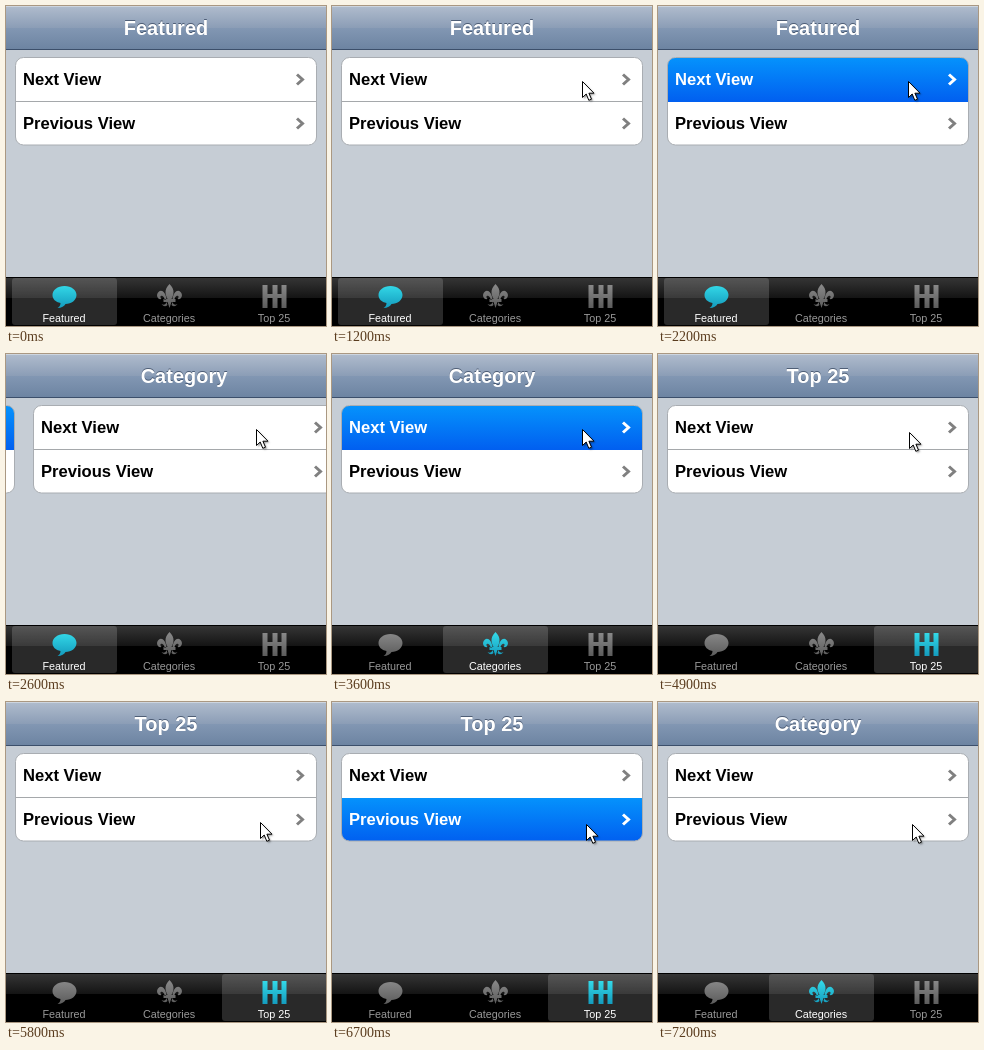
Animation of 320 by 320 pixels, one loop 8 s. Source, as an HTML page with a canvas:

```html
<!DOCTYPE html>
<html lang="en">
<head>
<meta charset="utf-8">
<title>Tab view slides</title>
<style>
  html, body { margin: 0; width: 100%; height: 100%; overflow: hidden; background: #c6cdd5; }
  canvas { display: block; width: 100vw; height: 100vh; }
</style>
</head>
<body>
<canvas id="stage" width="320" height="320"></canvas>
<script>
const ctx = document.getElementById('stage').getContext('2d');
const LOOP = 8000, STEP = 100, SLIDE_MS = 300;
const FONT = '"Liberation Sans", Arial, sans-serif';
const TITLES = ['Featured', 'Category', 'Top 25'];
const TABS = ['Featured', 'Categories', 'Top 25'];
const ROWS = ['Next View', 'Previous View'];

// Each press highlights a row, slides the next view in, then updates the tab bar.
const PRESSES = [
  { from: 0, to: 1, row: 0, press: 2200, slide: 2350, done: 2800 },
  { from: 1, to: 2, row: 0, press: 3600, slide: 3750, done: 4200 },
  { from: 2, to: 1, row: 1, press: 6700, slide: 6850, done: 7200 }
];
// time, x, y
const CURSOR_PATH = [
  [800, 294, 97], [1200, 250, 75], [4800, 250, 75],
  [4900, 251, 78], [5700, 254, 117], [5900, 254, 122]
];

const ICONS = [
  new Path2D('M0-10C7-10 12-6 12-1C12 4 7 8 1 8C0 10-3 12-7 12C-5 11-4 9-4 7C-9 6-12 3-12-1C-12-6-7-10 0-10Z'),
  new Path2D('M0-12C6-6 4-1 2 3H-2C-4-1-6-6 0-12Z' +
    'M3 3C4-4 8-7 11-4C14-1 12 4 8 3C10 1 9-1 7 0C5 1 5 3 5 4Z' +
    'M-3 3C-4-4-8-7-11-4C-14-1-12 4-8 3C-10 1-9-1-7 0C-5 1-5 3-5 4Z' +
    'M-6 3H6V6H-6Z M-2 6H2L0 12Z M3 6Q4 10 8 8Q5 12 2 9Z M-3 6Q-4 10-8 8Q-5 12-2 9Z'),
  new Path2D('M-12-11H-7V-2H-2V-11H3V-2H7V-11H12V12H7V2H3V12H-2V2H-7V12H-12Z')
];
const ARROW = new Path2D('M.5.5V16.5L4.2 13L6.8 19.3L9.5 18.2L6.9 12.2H12Z');

function gradient(top, bottom, ...colors) {
  const g = ctx.createLinearGradient(0, top, 0, bottom);
  colors.forEach((c, i) => g.addColorStop(i / (colors.length - 1), c));
  return g;
}

function box(x, y, w, h, fill) {
  ctx.fillStyle = fill;
  ctx.fillRect(x, y, w, h);
}

function text(str, x, y, font, color, align = 'left') {
  ctx.font = `${font} ${FONT}`;
  ctx.textAlign = align;
  ctx.fillStyle = color;
  ctx.fillText(str, x, y);
}

// The ease-in-out cubic Bezier (.42, 0, .58, 1), solved by Newton's method.
function easeInOut(x) {
  if (x <= 0) return 0;
  if (x >= 1) return 1;
  let s = x;
  for (let i = 0; i < 5; i++) {
    s -= (1.26 * s - 0.78 * s * s + 0.52 * s ** 3 - x) / (1.26 - 1.56 * s + 1.56 * s * s);
  }
  return s * s * (3 - 2 * s);
}

function drawBackground() {
  box(0, 0, 320, 320, '#c6cdd5');
  box(0, 0, 320, 22, gradient(0, 22, '#b0bccd', '#8b9db6'));
  box(0, 22, 320, 21, gradient(22, 43, '#8297b3', '#6d84a2'));
  box(0, 0, 320, 1, '#cdd5df');
  box(0, 43, 320, 1, '#3c4f6b');
}

function drawView(view, dx, pressedRow) {
  ctx.save();
  ctx.translate(dx, 0);
  text(TITLES[view], 160, 28, 'bold 20px', 'rgba(40,55,80,.65)', 'center');
  text(TITLES[view], 160, 29, 'bold 20px', '#fff', 'center');

  const list = new Path2D();
  list.roundRect(9.5, 51.5, 301, 87.5, 8);
  ctx.save();
  ctx.clip(list);
  box(9, 51, 302, 89, '#fff');
  if (pressedRow >= 0) {
    const top = 52 + 44 * pressedRow;
    box(9, top, 302, 44, gradient(top, top + 44, '#0592fc', '#015ff0'));
  }
  if (pressedRow < 0) box(9, 95, 302, 1, '#a5a8ab');
  ctx.restore();
  ctx.lineWidth = 1;
  ctx.strokeStyle = '#a9adb2';
  ctx.stroke(list);

  ROWS.forEach((label, i) => {
    const y = 73 + 44 * i, pressed = i === pressedRow;
    text(label, 17, y + 6, 'bold 16.6px', pressed ? '#fff' : '#000');
    ctx.strokeStyle = pressed ? '#fff' : '#808080';
    ctx.lineWidth = 3;
    ctx.beginPath();
    ctx.moveTo(291, y - 4.5);
    ctx.lineTo(296.5, y + 0.5);
    ctx.lineTo(291, y + 5.5);
    ctx.stroke();
  });
  ctx.restore();
}

function drawTabs(active) {
  box(0, 271, 320, 49, '#000');
  box(0, 272, 320, 20, gradient(272, 292, '#353535', '#141414'));
  TABS.forEach((label, i) => {
    const left = 6 + 105 * i, on = i === active;
    if (on) {
      ctx.fillStyle = 'rgba(255,255,255,.16)';
      ctx.beginPath();
      ctx.roundRect(left, 272, 105, 47, 3);
      ctx.fill();
    }
    ctx.save();
    ctx.translate(left + 52.5, 290);
    ctx.fillStyle = on ? gradient(-12, 12, '#35dcea', '#149bbd') : gradient(-12, 12, '#8a8a8a', '#5c5c5c');
    ctx.fill(ICONS[i]);
    ctx.restore();
    text(label, left + 52, 316, '10.8px', on ? '#fff' : '#999', 'center');
  });
}

function drawCursor(t) {
  if (t < CURSOR_PATH[0][0]) return;
  const next = CURSOR_PATH.findIndex(p => p[0] > t);
  const b = CURSOR_PATH.at(next), a = next < 0 ? b : CURSOR_PATH[next - 1];
  const k = a === b ? 0 : (t - a[0]) / (b[0] - a[0]);
  ctx.save();
  ctx.translate(Math.round(a[1] + (b[1] - a[1]) * k), Math.round(a[2] + (b[2] - a[2]) * k));
  ctx.shadowColor = 'rgba(0,0,0,.4)';
  ctx.shadowBlur = 2;
  ctx.shadowOffsetX = ctx.shadowOffsetY = 1.5;
  ctx.fillStyle = '#fff';
  ctx.fill(ARROW);
  ctx.shadowColor = 'transparent';
  ctx.strokeStyle = '#000';
  ctx.lineWidth = 1;
  ctx.stroke(ARROW);
  ctx.restore();
}

function draw(time) {
  const t = Math.floor((time % LOOP) / STEP) * STEP;
  const event = PRESSES.findLast(p => t >= p.press);
  drawBackground();
  if (!event) {
    drawView(0, 0, -1);
    drawTabs(0);
  } else {
    const progress = easeInOut((t - event.slide) / SLIDE_MS);
    const direction = Math.sign(event.to - event.from);
    const shift = Math.round(320 * progress);
    if (progress < 1) drawView(event.from, -direction * shift, event.row);
    if (progress > 0) drawView(event.to, direction * (320 - shift), -1);
    drawTabs(t >= event.done ? event.to : event.from);
  }
  drawCursor(t);
}

const start = performance.now();
function tick() {
  draw(performance.now() - start);
  requestAnimationFrame(tick);
}
tick();
</script>
</body>
</html>
```
